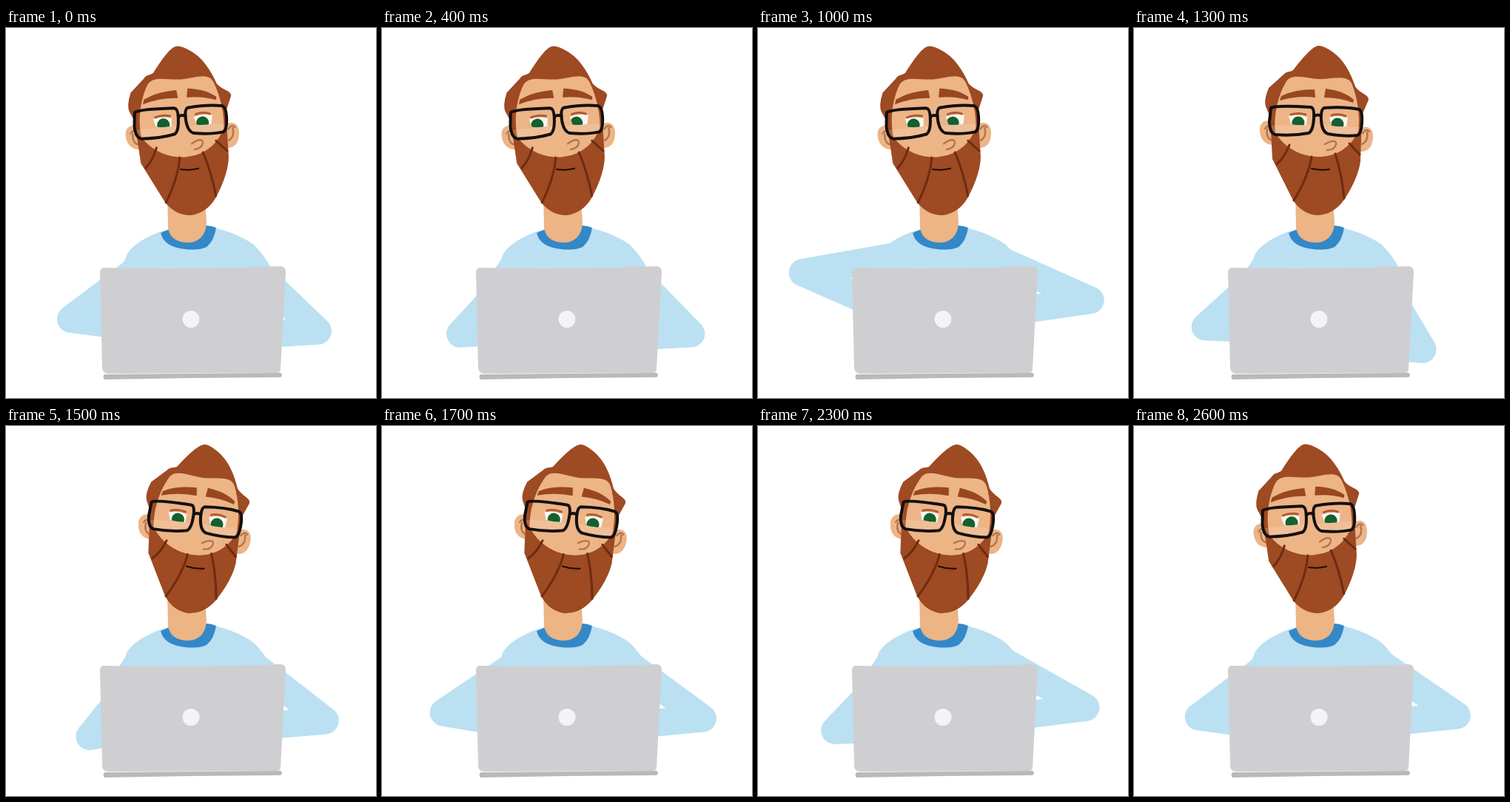
An HTML page that plays this animation: 500x500 px, repeating every 2700 ms.

```html
<!DOCTYPE html>
<html lang="en">
<head>
<meta charset="utf-8">
<title>Typing at a laptop</title>
<style>
  html, body { margin: 0; width: 100%; height: 100%; overflow: hidden; background: #fff; }
  svg { display: block; width: 100vw; height: 100vh; }
  .line { fill: none; stroke-linecap: round; stroke-linejoin: round; }
  .arm { stroke: #bbe0f2; stroke-width: 37; }
  .skin { fill: #edb486; }
  .hair { fill: #9e4a22; }
  .crease { stroke: #b0764f; stroke-width: 2.4; }
  .strand { stroke: #6e2b13; stroke-width: 3; }
  .frame { stroke: #14100f; stroke-width: 4; }
  .lid { stroke: #ad5c33; stroke-width: 3; }
  .white { fill: #f7f5f2; }
  .iris { fill: #14602f; }
</style>
</head>
<body>
<svg viewBox="0 0 500 500">
  <defs>
    <path id="eyeL" d="M209 119Q221 116 234 120L233 131Q222 132 212 130Z"/>
    <path id="eyeR" d="M264 121Q276 117 289 121L287 133Q276 134 267 132Z"/>
    <path id="lensL" d="M185 108Q191 104 239 107Q244 108 243 122Q242 139 236 142Q215 146 191 144Q183 142 183 126Z"/>
    <path id="lensR" d="M257 108Q285 106 304 110Q309 112 308 128Q307 143 302 145Q285 147 262 143Q254 140 253 125Q252 110 257 108Z"/>
    <clipPath id="clipL"><use href="#eyeL"/></clipPath>
    <clipPath id="clipR"><use href="#eyeR"/></clipPath>
  </defs>

  <path id="armL" class="line arm"/>
  <path id="armR" class="line arm"/>
  <path fill="#bbe0f2" d="M212 274C186 283 168 296 163 307Q161 315 153 324V345H358V324Q349 307 335 293C320 282 302 275 282 270Z"/>
  <path fill="#3488c8" d="M209 277L220 272L271 267Q278 267 284 270Q281 288 271 296Q258 302 236 298Q213 294 209 277Z"/>
  <path class="skin" d="M218 225L219 270Q222 290 247 290Q270 288 271 262L268 225Z"/>

  <g id="head">
    <path class="skin" d="M188 127C176 122 169 129 170 140C171 153 180 159 190 158ZM305 136C316 130 324 136 323 148C322 161 316 168 305 167Z"/>
    <path class="line crease" d="M177 136Q181 130 185 134M180 137Q178 149 187 152M309 142Q314 135 318 140M315 141Q317 153 308 157"/>
    <path class="hair" d="M249 24C241 25 229 39 215 57C210 60 206 58 202 63L182 81Q175 98 178 106L184 120L187 177L215 233Q228 252 248 253Q270 252 284 232Q303 203 306 180L308 118L317 97Q317 93 312 90Q302 84 299 79C293 61 283 42 268 32Q255 23 249 24Z"/>
    <path class="skin" d="M206 72C214 60 236 69 251 69C270 69 290 62 295 77C302 95 306 120 303 140C291 164 271 174 249 174C226 174 204 162 191 142C188 115 196 88 206 72Z"/>
    <path class="line strand" d="M210 158Q204 174 193 184M240 174Q236 200 216 233M272 170Q281 198 284 230M291 156L305 171"/>
    <path class="line" stroke="#1c0d08" stroke-width="2" d="M240 190Q252 193 264 191"/>
    <path class="line crease" d="M258 157C266 152 274 151 273 157Q271 165 261 165"/>
    <path fill="#984720" d="M197 98L199 92Q216 83 244 83L245 94Q222 91 197 98ZM259 82Q284 85 297 97L296 101Q278 94 257 94Z"/>
    <use href="#eyeL" class="white"/>
    <use href="#eyeR" class="white"/>
    <g clip-path="url(#clipL)"><circle class="iris" cx="222" cy="128" r="8.5"/></g>
    <g clip-path="url(#clipR)"><circle class="iris" cx="275" cy="130" r="8.5"/></g>
    <path class="line lid" d="M212 117Q222 114 232 117M267 118Q276 115 286 119"/>
    <path fill="#fff" opacity=".15" d="M184 132L242 131Q241 140 236 142Q215 146 191 144Q184 142 184 132ZM254 132L307 134Q306 143 302 145Q285 147 262 143Q256 141 254 132Z"/>
    <use href="#lensL" class="line frame"/>
    <use href="#lensR" class="line frame"/>
    <path class="line frame" d="M244 119Q248 116 253 119"/>
  </g>

  <path fill="#cfcfd1" d="M132 324Q250 327 371 322Q378 322 378 330L371 461Q371 466 366 466L137 467Q131 466 130 460L127 330Q127 324 132 324Z"/>
  <path fill="#b9b9b9" d="M133 468L371 466Q375 469 371 472L250 473L133 475Q130 471 133 468Z"/>
  <circle cx="250" cy="393.5" r="11.5" fill="#f3f4f6"/>
</svg>

<script>
  const STEP = 100, STEPS = 27, UPPER_ARM = 147, LEAN = 5.3;
  const $ = id => document.getElementById(id);
  const irises = document.querySelectorAll('.iris');

  // Each swing is a turning point: step and angle of the upper arm below horizontal.
  const arms = [
    { path: $('armL'), side: -1, shoulder: [205, 305], wristX: 140, follow: 0.55,
      swings: [[3.5, 48], [10, 10], [14.5, 53], [17, 34], [20.3, 53], [26.5, 36.5]] },
    { path: $('armR'), side: 1, shoulder: [315, 308], wristX: 370, follow: 0.8,
      swings: [[1.5, 51], [10, 24], [13.3, 60], [15.8, 31], [18.5, 44], [24.5, 27]] }
  ];

  // Cosine easing from one turning point to the next, around the loop.
  function swingAngle(swings, step) {
    const next = swings.findIndex(([at]) => at > step);
    const [to, b] = swings.at(Math.max(next, 0));
    const [from, a] = swings.at(next > 0 ? next - 1 : -1);
    const wrap = n => (n + STEPS) % STEPS;
    const u = wrap(step - from) / wrap(to - from);
    return a + (b - a) * (1 - Math.cos(Math.PI * u)) / 2;
  }

  function drawArm({ path, side, shoulder: [sx, sy], wristX, follow, swings }, step) {
    const angle = swingAngle(swings, step) * Math.PI / 180;
    const x = sx + side * UPPER_ARM * Math.cos(angle);
    const y = sy + UPPER_ARM * Math.sin(angle);
    const wristY = 401 + (y - 395) * follow;
    path.setAttribute('d', `M${sx} ${sy}L${x} ${y}L${wristX} ${wristY}`);
  }

  function draw(now) {
    const step = Math.floor(now / STEP) % STEPS;
    arms.forEach(arm => drawArm(arm, step));

    const phase = 2 * Math.PI * step / STEPS;
    const look = Math.cos(2 * phase) - 2 * Math.sin(phase) - 0.8;
    irises.forEach(iris => iris.setAttribute('transform', `translate(${look})`));

    // Leans right around step 19, upright for one step on the way in and out.
    const lean = LEAN * Math.sign(6 - Math.abs(step - 19));
    $('head').setAttribute('transform', `rotate(${lean} 248 232)`);
  }

  const start = performance.now();
  function tick() {
    draw(performance.now() - start);
    requestAnimationFrame(tick);
  }
  tick();
</script>
</body>
</html>
```
